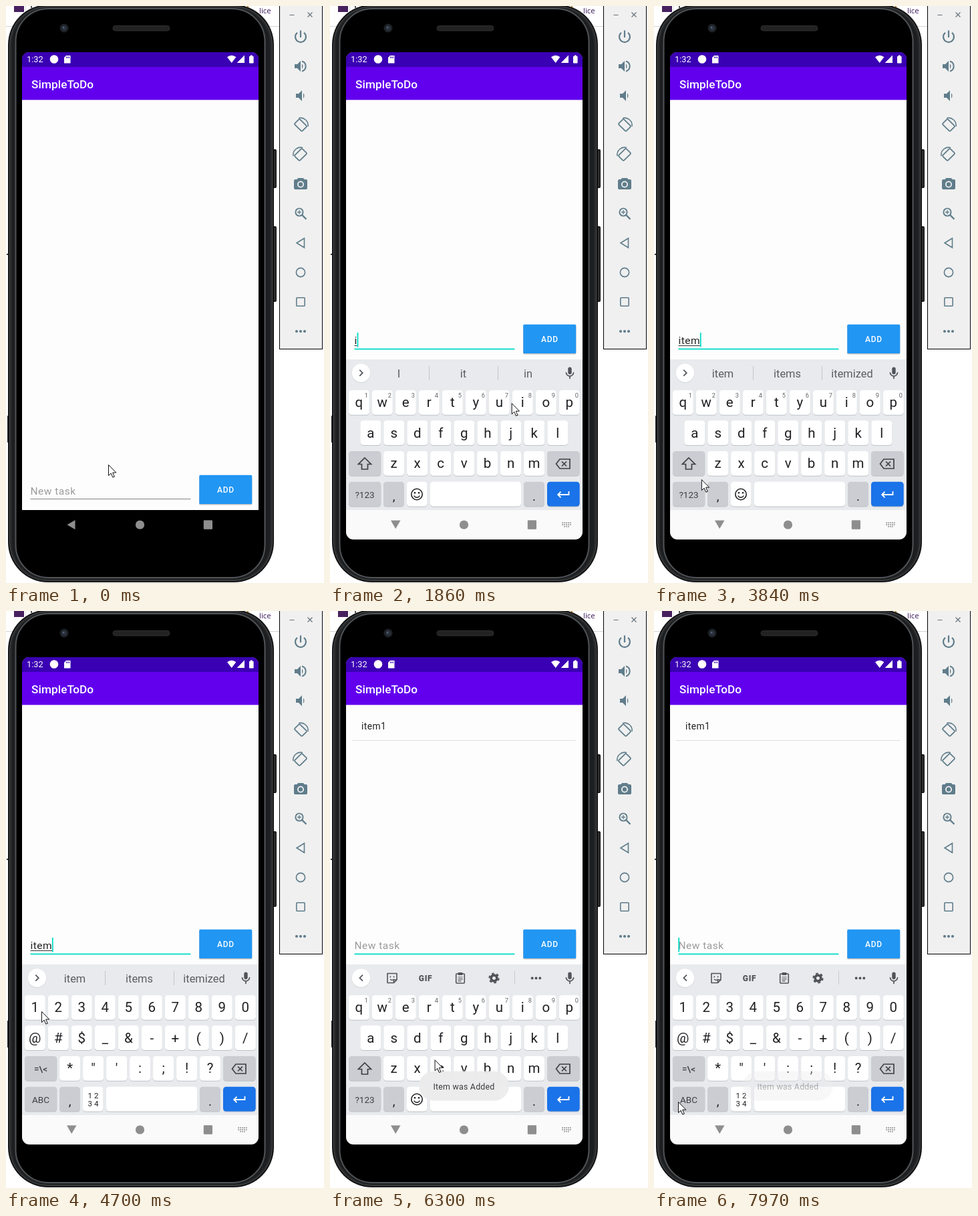
An HTML page for the animation above (8000 ms loop, 476 by 862 pixels).

```html
<!DOCTYPE html>
<html lang="en">
<head>
<meta charset="utf-8">
<title>To-do demo</title>
<style>
html, body { margin: 0; width: 100%; height: 100%; overflow: hidden; background: #fff; }
svg { display: block; width: 100%; height: 100%; font-family: Roboto, "Noto Sans", sans-serif; }
text { white-space: pre; }
.mid { text-anchor: middle; }
.field { font-size: 15.5px; letter-spacing: .03125em; }
</style>
</head>
<body>
<svg id="stage" viewBox="0 0 476 862"></svg>
<script>
const LOOP = 8000;
const stage = document.getElementById('stage');

// Markup helpers
const rect = (x, y, w, h, fill, rx = 0, extra = '') =>
  `<rect x="${x}" y="${y}" width="${w}" height="${h}" rx="${rx}" fill="${fill}" ${extra}/>`;
const disc = (x, y, r, fill, extra = '') => `<circle cx="${x}" cy="${y}" r="${r}" fill="${fill}" ${extra}/>`;
const fill = (d, color) => `<path d="${d}" fill="${color}"/>`;
const line = (d, color, w = 1.6, extra = '') =>
  `<path d="${d}" fill="none" stroke="${color}" stroke-width="${w}" ${extra}/>`;
const label = (x, y, size, color, str, extra = 'class="mid"') =>
  `<text x="${x}" y="${y}" font-size="${size}" fill="${color}" ${extra}>${
    str.replace(/&/g, '&amp;').replace(/</g, '&lt;')}</text>`;
const group = (id, body, extra = '') => `<g id="${id}" ${extra}>${body}</g>`;
const at = (x, y, body) => `<g transform="translate(${x} ${y})">${body}</g>`;

function page() {
  return rect(0, 0, 476, 862, '#fff') + rect(0, 30, 409, 1, '#d5d5d5') +
    rect(12, 0, 15, 9, '#47215f') + rect(29, 0, 1, 10, '#ddd') + rect(37, 0, 2, 3, '#555') +
    rect(361, 0, 2, 2, '#c08a30') +
    label(379, 11, 11.5, '#3c1a5b', 'lice', 'font-family="Open Sans, sans-serif"') +
    rect(1, 370, 2, 2, '#333') + rect(2, 612, 2, 40, '#222');
}

function phone() {
  const button = (y, h) => rect(399, y, 6, h, '#171717', 2) + rect(402, y + 2, 1, h - 4, '#4c4c4c');
  return button(214, 58) + button(329, 113) +
    rect(3, -2, 398, 863, '#141414', 60) +
    rect(5.5, .5, 393, 858, '#26282a', 57.5, 'stroke="#46494b"') +
    rect(9, 3, 386, 853, '#1d1e1f', 54) +
    rect(14.5, 4, 373, 850, '#000', 49, 'stroke="#505457" stroke-width="2"') +
    rect(17, 7, 368, 844, '#000', 46) +
    rect(160, 29.5, 85, 7.5, '#222', 3.7, 'stroke="#2f2f2f"') +
    disc(87, 33, 6.5, '#1e2226') + disc(87, 33, 3.5, '#2c3440') + disc(86, 32, 1.3, '#52617a');
}

function panel() {
  const c = '#607d8b', x = 441;
  const speaker = 'M-9 -3H-5L0 -8V8L-5 3H-9Z';
  const turn = rect(-5.5, -8, 11, 16, 'none', 1.5, `stroke="${c}" stroke-width="1.8" transform="rotate(-45)"`) +
    line('M-3 -10.3A11 11 0 0 1 11 2', c, 1.6);
  return rect(409.5, -2, 64, 514.5, '#f0f0f0', 0, 'stroke="#000"') +
    line('M424.5 13.5H431.5M451.5 9.5L458.5 16.5M458.5 9.5L451.5 16.5', '#66717a', 1.2) +
    at(x, 46, line('M-5 -6.2A8 8 0 1 0 5 -6.2M0 -9.5V1', c, 2.2)) +
    at(x, 90, fill(speaker, c) + fill('M2 -4Q5 0 2 4Z', c) + line('M2 -7.5A7.8 7.8 0 0 1 2 7.5', c, 2)) +
    at(x + 2, 134, fill(speaker, c) + fill('M2 -4Q5 0 2 4Z', c)) +
    at(x, 178, turn) +
    at(x, 222, `<g transform="scale(-1 1)">${turn}</g>`) +
    at(x, 266, fill('M-4 -9H4L5.5 -7H8A2 2 0 0 1 10 -5V6A2 2 0 0 1 8 8H-8A2 2 0 0 1 -10 6V-5A2 2 0 0 1 -8 -7H-5.5Z', c) +
      disc(0, .5, 5, '#f0f0f0') + disc(0, .5, 3.2, c)) +
    at(x - 2, 308, disc(0, 0, 5.6, 'none', `stroke="${c}" stroke-width="1.9"`) +
      line('M4.3 4.3L10.5 10.5', c, 2.4) + line('M-3 0H3M0 -3V3', c, 1.3)) +
    at(x, 354, line('M5.5 -7V7L-6 0Z', c, 1.6)) +
    disc(x, 398, 6.6, 'none', `stroke="${c}" stroke-width="1.6"`) +
    rect(x - 6.2, 435.8, 12.4, 12.4, 'none', 1, `stroke="${c}" stroke-width="1.6"`) +
    [-6, 0, 6].map(d => disc(x + d, 486, 2.1, c)).join('');
}

function bars() {
  return rect(24, 69, 354, 71.3, '#6200ee') + rect(24, 69, 354, 22, '#3a00b3') +
    label(31, 84.3, 12.8, '#fff', '1:32', '') + disc(72, 79.5, 6.3, '#fff') +
    fill('M90 74H96.5V85.5H87V77Z', '#fff') + rect(90, 75.5, 1, 2.5, '#3a00b3') +
    rect(92, 75.5, 1, 2.5, '#3a00b3') + rect(94, 75.5, 1, 2.5, '#3a00b3') +
    fill('M331 76.3Q337.7 71.3 344.4 76.3L337.7 85Z', '#fff') +
    fill('M357 73.5V85H345.7Z', '#fff') + rect(364, 75, 6.6, 10.5, '#fff', .8) + rect(365.8, 73.5, 3, 2, '#fff') +
    label(38, 122.6, 17.2, '#fff', 'SimpleToDo', 'font-weight="500" letter-spacing=".004em"');
}

function entry() {
  return label(36.5, 729.5, 15.5, '#9b9b9b', 'New task', 'id="hint" class="field"') +
    label(36.5, 729.5, 15.5, '#242424', '', 'id="typed" class="field"') +
    rect(36.5, 732, 0, 1, '#333', 0, 'id="compose"') +
    rect(36.5, 736, 240, 1, '#858585', 0, 'id="rule"') +
    rect(36.3, 713, 1.8, 21.5, '#03dac5', 0, 'id="caret"') +
    rect(289, 702, 79.5, 43.6, '#000', 2, 'opacity=".22"') +
    rect(289.3, 700.7, 78.9, 43.3, '#2196f3', 1.5) +
    label(329, 727.3, 12, '#fff', 'ADD', 'class="mid" font-weight="500" letter-spacing=".06em"');
}

// Keyboard
const KEY = '#fff', MOD = '#cbcdd3', INK = '#202124', GREY = '#5f6368';
const rowY = [574, 619.3, 665, 710.7];
const key = (x, w, row, color = KEY) =>
  rect(x, rowY[row] + 1, w, 36.8, '#bfc2c7', 4.5) + rect(x, rowY[row], w, 36.8, color, 4.5);

const letters = (chars, row, x0, superscript) => [...chars].map((ch, i) => {
  const x = x0 + i * 35;
  return key(x - 15.5, 31, row) + label(x, rowY[row] + 25.3, 20.5, INK, ch) +
    (superscript ? label(x + 11, rowY[row] + 11, 9.3, GREY, String((i + 1) % 10)) : '');
}).join('');

function sharedKeys() {
  return key(28, 48.3, 2, MOD) + key(325, 48.7, 2, MOD) + key(28, 48.3, 3, MOD) +
    key(80, 31, 3, MOD) + key(115, 30.5, 3) + key(150, 136, 3) + key(290, 31, 3, MOD) +
    key(325, 48.7, 3, '#1a73e8') +
    label(95.5, 738.5, 19, INK, ',') + label(305.5, 738.5, 19, INK, '.') +
    at(349, 684, line('M-10.5 0L-5 -7H10V7H-5Z', '#3c4043', 1.7) + line('M-2 -3.5L5 3.5M5 -3.5L-2 3.5', '#3c4043', 1.7)) +
    at(349, 730, line('M8.5 -5V0H-7.5M-3.5 -4.3L-7.8 0L-3.5 4.3', '#fff', 1.8));
}

function alphaKeys() {
  return letters('qwertyuiop', 0, 43.3, true) + letters('asdfghjkl', 1, 60.8) + letters('zxcvbnm', 2, 95.6) +
    at(52, 684, line('M0 -9L9.5 .5H4.5V8H-4.5V.5H-9.5Z', '#3c4043', 1.7)) +
    label(52, 734.5, 13.5, '#3c4043', '?123') +
    at(130, 729.5, disc(0, 0, 8.2, 'none', `stroke="${INK}" stroke-width="1.6"`) +
      disc(-3, -2.3, 1.3, INK) + disc(3, -2.3, 1.3, INK) + line('M-4.3 2A4.8 4.8 0 0 0 4.3 2', INK, 1.5));
}

function symbolKeys() {
  return letters('1234567890', 0, 43.3) + letters('@#$_&-+()/', 1, 43.3) + letters('*"\':;!?', 2, 95.6) +
    label(52, 689, 13.5, '#3c4043', '=\\<', 'class="mid" font-weight="500"') +
    label(52, 734.5, 13.5, '#3c4043', 'ABC') +
    label(130.5, 727.5, 11.5, INK, '1 2') + label(130.5, 739.5, 11.5, INK, '3 4');
}

function tools() {
  const c = '#50545a';
  return line('M49 543.7L44.5 548.2L49 552.7', c, 1.7) +
    at(93, 548.5, line('M-7 -7H7V2.5L2.5 7H-7ZM7 2.5H2.5V7', c, 1.6, 'stroke-linejoin="round"') +
      disc(-2.6, -2, 1, c) + disc(2.6, -2, 1, c) + line('M-3 1.5Q0 4.5 3 1.5', c, 1.3)) +
    label(143, 552.8, 12, c, 'GIF', 'class="mid" font-weight="800" letter-spacing=".06em"') +
    at(195, 548.5, rect(-6.3, -6.5, 12.6, 14, 'none', 1, `stroke="${c}" stroke-width="1.6"`) +
      rect(-3.5, -8.5, 7, 4, c, 1) + line('M-3.5 -1.5H3.5M-3.5 1.3H3.5M-3.5 4.2H1.5', c, 1.2)) +
    at(245.5, 548.5, disc(0, 0, 4.4, 'none', `stroke="${c}" stroke-width="3.6"`) +
      disc(0, 0, 7, 'none', `stroke="${c}" stroke-width="2.2" stroke-dasharray="3.665"`)) +
    rect(276, 538, 1, 20, '#c9ccd0') +
    [-5.8, 0, 5.8].map(d => disc(308.5 + d, 548.5, 1.9, c)).join('');
}

function suggestions() {
  return line('M44.3 543.7L48.8 548.2L44.3 552.7', '#50545a', 1.7) +
    rect(148, 538, 1, 21, '#c4c7cb') + rect(251, 538, 1, 21, '#c4c7cb') +
    [103, 199.5, 296.5].map((x, i) => label(x, 554.5, 16.4, '#5a5e63', '', `class="mid" id="word${i}"`)).join('');
}

function keyboard() {
  const c = '#50545a';
  return rect(24, 528, 354, 225, '#e8eaed') + disc(46.5, 549, 14, '#d2d5d9') + disc(46.5, 548.3, 13.7, '#fff') +
    at(359, 548.5, rect(-2.7, -9, 5.4, 10.8, c, 2.7) + line('M-5.6 -1.2A5.6 5.6 0 0 0 5.6 -1.2M0 4.5V8.5', c, 1.7)) +
    group('tools', tools()) + group('strip', suggestions()) + sharedKeys() +
    group('alpha', alphaKeys()) + group('symbol', symbolKeys());
}

function navigation() {
  const c = '#8e8e8e';
  const dots = (n, x, y) => [...Array(n)].map((_, i) => rect(x + i * 2.9, y, 1.7, 1.7, c)).join('');
  return group('back', fill('M91.5 775L103.5 768V782Z', c)) + group('down', fill('M91 768.5H105.5L98.2 781Z', c)) +
    disc(200.5, 775, 6.6, c) + rect(295.8, 768.3, 13.2, 13.4, c, 1.2) +
    group('ime', dots(5, 347.3, 771.2) + dots(5, 347.3, 774) + dots(3, 350.2, 776.8));
}

stage.innerHTML =
  `<clipPath id="screen">${rect(24, 69, 354, 728, '#fff', 11)}</clipPath>` +
  page() + phone() + panel() +
  `<g clip-path="url(#screen)">` +
  rect(24, 69, 354, 684, '#fdfdfd') + bars() +
  group('item', label(47, 177, 13.8, '#222', 'item1', 'letter-spacing=".03125em"') + rect(33, 193, 335, 1, '#dedede')) +
  group('lower', rect(24, 753, 354, 44, '#fafafa')) +
  group('entry', entry()) + group('keyboard', keyboard()) + group('nav', navigation()) +
  group('toast', rect(133, 687.5, 135, 44, '#ececed', 22) +
    label(200.5, 714.7, 12.4, '#333', 'Item was Added', 'class="mid" letter-spacing=".018em"')) +
  `</g>` +
  group('pointer', `<path d="M.5 .5V16.5L4.2 13.1L6.9 19.2L9.4 18.1L6.7 12.1H11.8Z" fill="#fff" stroke="#111"/>`);

const ui = {};
stage.querySelectorAll('[id]').forEach(el => ui[el.id] = el);

// Timeline
const TAP = 470, OPEN = 1170, SYMBOLS = 4250, ADDED = 5800, SYMBOLS_AGAIN = 6900;
const typing = [[0, ''], [1700, 'i'], [2430, 'it'], [2750, 'ite'], [3450, 'item'], [4950, 'item1'], [ADDED, '']];
const blinks = [TAP, 1700, 2430, 2750, 3450, 4950, 5635];
const words = {
  i: ['I', 'it', 'in'], it: ['it', "it's", 'or'], ite: ['ite', 'item', 'items'],
  item: ['item', 'items', 'itemized'], item1: ['item1', 'item', 'items']
};
const path = [
  [0, 153, 685], [60, 153, 685], [380, 140, 713], [740, 140, 713], [1220, 276, 587], [1530, 285, 593],
  [1800, 285, 593], [2280, 180, 594], [2460, 180, 594], [2670, 120, 593], [2850, 114, 593],
  [3180, 305, 660], [3330, 306, 680], [3480, 306, 680], [3840, 71, 707], [4000, 52, 722],
  [4300, 52, 722], [4700, 53, 598], [4820, 45, 592], [5020, 45, 592], [5600, 327, 500],
  [5900, 327, 500], [6300, 157, 670], [6530, 58, 727], [6700, 45, 730], [6930, 45, 730],
  [7550, 6, 740], [7720, 6, 740], [7970, 36, 733], [8000, 36, 733]
];

const clamp = v => Math.max(0, Math.min(1, v));
const ramp = (t, from, to) => clamp((t - from) / (to - from));
const show = (id, on) => ui[id].setAttribute('display', on ? 'inline' : 'none');
const set = (id, attrs) => { for (const k in attrs) ui[id].setAttribute(k, attrs[k]); };
const move = (id, x, y) => set(id, { transform: `translate(${x} ${y})` });

function pointerAt(t) {
  const i = Math.max(1, path.findIndex(p => p[0] > t));
  const [t0, x0, y0] = path[i - 1], [t1, x1, y1] = path[i];
  const k = ramp(t, t0, t1);
  return [x0 + (x1 - x0) * k, y0 + (y1 - y0) * k];
}

function draw(t) {
  const open = t >= OPEN, focused = t >= TAP;
  const word = typing.filter(s => s[0] <= t).pop()[1];

  show('lower', open);
  move('entry', 0, open ? -225 : 0);
  show('hint', !word);
  ui.typed.textContent = word;
  const width = word ? ui.typed.getComputedTextLength() : 0;
  set('compose', { width });
  set('rule', focused ? { fill: '#03dac5', y: 736.6, height: 1.8 } : { fill: '#858585', y: 736, height: 1 });
  const base = blinks.filter(b => b <= t).pop();
  show('caret', focused && (t - base) % 1000 < 500);
  set('caret', { x: 36.3 + width });

  const slide = 1 - (1 - ramp(t, OPEN - 20, 1420)) ** 2;
  show('keyboard', open);
  move('keyboard', 0, 54 * (1 - slide));
  set('keyboard', { opacity: ramp(t, OPEN - 30, 1215) });
  const symbols = t >= SYMBOLS && t < ADDED || t >= SYMBOLS_AGAIN;
  show('alpha', !symbols);
  show('symbol', symbols);
  show('tools', !word);
  show('strip', !!word);
  if (word) words[word].forEach((w, i) => ui['word' + i].textContent = w);

  const settled = t >= 1300;
  show('back', !settled);
  show('down', settled);
  show('ime', open);
  set('nav', { opacity: open && !settled ? .6 : 1 });

  show('item', t >= ADDED);
  set('toast', { opacity: .95 * ramp(t, 5850, 6000) * (1 - ramp(t, 7880, 8030)) });
  move('pointer', ...pointerAt(t));
}

function tick() {
  draw(performance.now() % LOOP);
  requestAnimationFrame(tick);
}
tick();
</script>
</body>
</html>
```
